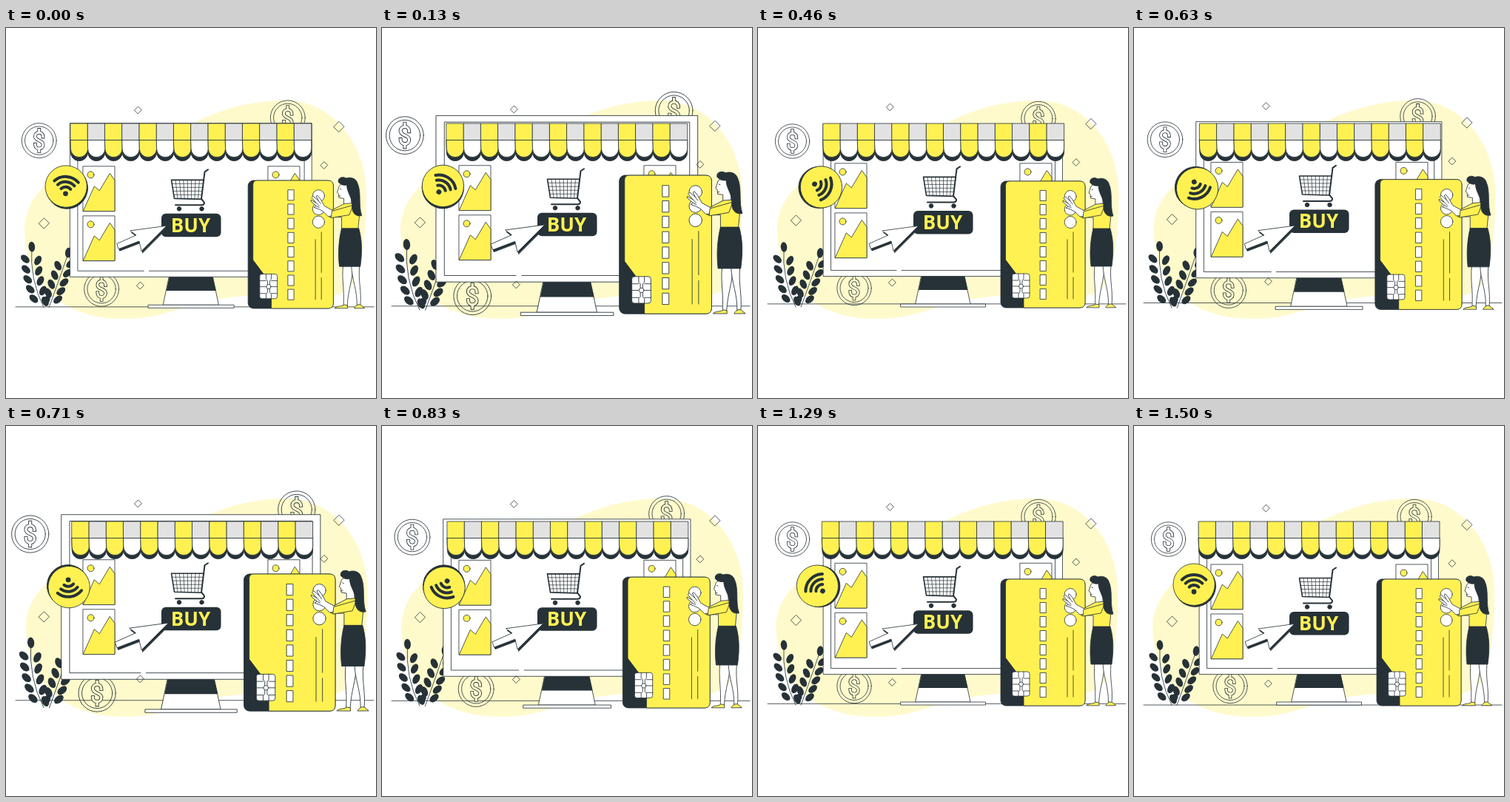
These frames come from a looping animation (500x500 px, 1.54 s). An HTML page:

```html
<!DOCTYPE html>
<html lang="en">
<head>
<meta charset="utf-8">
<title>Online shop</title>
<style>
  html, body { margin: 0; width: 100%; height: 100%; overflow: hidden; background: #fff; }
  svg { display: block; width: 100vw; height: 100vh; }
  .w { fill: #fff; }
  .y { fill: #fff152; }
  .d { fill: #263238; }
  .n { fill: none; }
  .l { stroke: #263238; stroke-width: .8; stroke-linejoin: round; stroke-linecap: round; }
  .buy { font: bold 26px "Noto Sans", "Open Sans", sans-serif; font-stretch: 62.5%; text-anchor: middle; }
</style>
</head>
<body>
<svg viewBox="0 0 500 500">
  <path class="sway" fill="#fffacb" d="M25 270C26 238 50 205 85 195C140 172 200 155 250 130C290 110 330 98 378 98C440 98 487 155 487 225C487 275 482 310 472 340C462 368 410 368 350 362C300 360 260 372 220 384C190 393 165 394 140 392C60 385 25 330 25 270Z"/>
  <path class="float n l" d="M13 377H497"/>
  <g class="beat" id="plants" data-c="52 333.5"></g>
  <g class="beat" id="coins" data-c="213 237"></g>

  <g class="beat" data-c="250 253.5">
    <path class="w l" d="M221 335H279L287 373H213Z"/>
    <path class="d" d="M221 335H279L283.5 354H217Z"/>
    <rect class="w l" x="193" y="373" width="114.5" height="4"/>
    <rect class="w l" x="88.5" y="130" width="323" height="205.5"/>
    <path class="n l" d="M187 327.5H98.5V138H401.5V327.5H194"/>
  </g>

  <g class="sway" id="awning"></g>

  <g class="float">
    <g id="pictures"></g>
    <g id="diamonds" class="l n"></g>
    <g id="cart" class="l n"></g>
    <rect class="d" x="210" y="251" width="80.5" height="31.5" rx="6"/>
    <text class="y buy" x="249.5" y="276">BUY</text>
  </g>

  <g class="beat" data-c="183 284">
    <path class="d l" d="M218 270L169.5 276.5L177.5 282.5L151.5 294L154 301L181.500 290.500L184.500 303.500Z"/>
    <path class="w l" d="M216.5 267.5L168 274L176 280L150 291.5L152.5 298.5L180 288L183 301Z"/>
  </g>

  <g id="badge">
    <circle class="d l" cx="82.4" cy="216.2" r="28.2"/>
    <circle class="y l" cx="81.1" cy="214.2" r="28.2"/>
    <circle class="d" cx="81" cy="224" r="3.4"/>
    <path id="waves" class="n" stroke="#263238" stroke-width="4" stroke-linecap="round"/>
  </g>

  <g class="beat" data-c="406 291">
    <rect class="d l" x="328" y="207" width="114" height="171" rx="7"/>
    <path class="y l" d="M334.5 313V213Q334.5 207 340 207H435Q442 207 442 214V371Q442 378 435 378H359V346Z"/>
    <g id="card"></g>
    <g id="woman" class="l">
      <path class="w" d="M455 320H468C468 342 462 350 460.5 375H455.5C457 350 453 342 455 320Z"/>
      <path class="w" d="M466 320H477C475 345 480 352 478 375H473.5C474 352 467 342 466 320Z"/>
      <path class="y" d="M444 377.5C447 374 455 376 456 373L461 374V377.5Z"/>
      <path class="y" d="M470 377.5C471 374 474 375 474 373H478L483.5 377.5Z"/>
      <path class="w" d="M456 209L450 214L447 223L449 224.5L449.5 230L456 231V240H466V212Z"/>
      <path class="n" d="M451 218l1.5 .5M449.500 228l2 -.5"/>
      <path class="y" d="M457 238L473 237L477 252L475 272H453V256L437 256L434 250Z"/>
      <path class="w" d="M441 247L430 241L425 232L421 227L419 228L422 234L415 228L413 230L419 237L412 233L412 235L419 241L416 243L422 245L428 248L435 255L443 254Z"/>
      <path class="n" d="M422 234L425 238M419 237L423 241M419 241L423 243"/>
      <path class="y" d="M468 240L440 248L439 257L463 253Z"/>
      <path class="d" d="M453 271H476C480 285 481 300 478 322H450C448 305 449 287 453 271Z"/>
      <path class="d" d="M449 209C447 203 455 201 459 204C465 202 472 204 474 210C480 223 475 240 480 254C471 256 466 249 467 239C467 229 460 223 460 213C455 214 451 212 449 209Z"/>
    </g>
  </g>
</svg>
<script>
const $ = id => document.getElementById(id);
const all = name => [...document.querySelectorAll("." + name)];
const repeat = (n, f) => Array.from({ length: n }, (_, i) => f(i)).join("");
const path = (cls, d) => `<path class="${cls}" d="${d}"/>`;
const circle = (cls, x, y, r) => `<circle class="${cls}" cx="${x}" cy="${y}" r="${r}"/>`;
const rect = (cls, x, y, w, h, extra = "") =>
  `<rect class="${cls}" x="${x}" y="${y}" width="${w}" height="${h}" ${extra}/>`;

// Sprigs: leaf pairs along a quadratic stem
const leaf = (x, y, angle) =>
  `<ellipse class="d" rx="4.3" ry="6.8" transform="translate(${x} ${y}) rotate(${angle})"/>`;
function sprig(x0, y0, cx, cy, x1, y1, lean) {
  const at = (a, b, c, q) => (1 - q) ** 2 * a + 2 * q * (1 - q) * b + q * q * c;
  return path("n l", `M${x0} ${y0}Q${cx} ${cy} ${x1} ${y1}`) + leaf(x1, y1, lean / 2) +
    repeat(5, i => {
      const q = .14 + i * .165, x = at(x0, cx, x1, q), y = at(y0, cy, y1, q);
      return leaf(x - 8.5, y + lean * .1, lean - 38) + leaf(x + 8.5, y - lean * .1, lean + 38);
    });
}
$("plants").innerHTML = sprig(51, 377, 32, 340, 35, 296, -10) + sprig(58, 377, 70, 345, 84, 304, 12);

const dollar = "M5.3 -5C5.3 -12.5 -5.3 -12.5 -5.3 -5.5C-5.3 1 5.3 -1 5.3 5.5C5.3 12.5 -5.3 12.5 -5.3 5M0 -14.5V-10.5M0 10.5V14.5";
const ink = (color, width) =>
  `<path fill="none" stroke="${color}" stroke-width="${width}" stroke-linecap="square" d="${dollar}"/>`;
$("coins").innerHTML = [[46.5, 153, "#fff"], [379, 122.5, "#fffacb"], [130, 351.5, "#fffacb"]].map(([x, y, core]) =>
  `<g transform="translate(${x} ${y})">${circle("n l", 0, 0, 23.2)}${circle("n l", 0, 0, 19)}${ink("#263238", 4.6)}${ink(core, 3)}</g>`).join("");

// Awning: 14 scalloped stripes with a dark edge below
const stripe = 325.5 / 14, left = 87.3;
const scallop = (cls, x, y, bottom) =>
  path(cls, `M${x} ${y}H${x + stripe}V${bottom}a${stripe / 2} 11.6 0 0 1 ${-stripe} 0Z`);
$("awning").innerHTML =
  repeat(14, i => scallop("d l", left + i * stripe, 151, 168)) +
  repeat(14, i => {
    const x = left + i * stripe, odd = i % 2;
    return scallop(odd ? "w l" : "y l", x, 151.5, 163) +
      rect(odd ? "l" : "y l", x, 129, stripe, 22.5, odd ? 'fill="#e2e2e2"' : "");
  });

$("pictures").innerHTML = [[104.3, 187], [104.3, 254], [354.3, 187]].map(([x, y]) =>
  `<g transform="translate(${x} ${y})">` + rect("w l", 0, 0, 42.7, 60.5) + circle("y l", 10.2, 11.5, 4.5) +
  path("y l", "M0 60.5L15 27L22 33L36 9.5L42.700 19V60.5Z") + "</g>").join("");

$("diamonds").innerHTML = [[178.5, 111, 4.8], [450, 133.5, 7], [430, 185.5, 4.8], [51.5, 264, 7], [181.5, 348, 4.8]]
  .map(([x, y, r]) => path("", `M${x - r} ${y}l${r} ${-r}l${r} ${r}l${-r} ${r}Z`)).join("");

$("cart").innerHTML =
  `<g stroke-width="1.6">${path("", "M223.5 205.5H267M223.5 205.5L227.5 230.5L264 231.5")}</g><g stroke-width=".7">` +
  repeat(7, i => path("", `M${229 + i * 5.4} 205.5L${232 + i * 4.6} 231`)) +
  repeat(4, i => path("", `M${224.3 + i * .8} ${210.5 + i * 5}H${266.4 - i * .6}`)) +
  `</g><g stroke-width="2">${path("", "M273 191.5L268.5 194.5L264 231L268 236Q268 239.5 264 239.5H229")}</g>` +
  circle("d", 234, 244.5, 2.8) + circle("d", 264.5, 244.5, 2.8);

$("waves").setAttribute("d", [9, 16, 23].map(r => {
  const k = r * Math.SQRT1_2;
  return `M${81 - k} ${224 - k}A${r} ${r} 0 0 1 ${81 + k} ${224 - k}`;
}).join(""));

$("card").innerHTML =
  repeat(8, i => rect("w l", 381.5, 219.5 + i * 19, 7.8, 14)) +
  repeat(3, i => circle("w l", 422.2, 227.5 + i * 17.5, 8)) +
  path("n l", "M418 286V366M426 276V330M426 337V366") +
  rect("w l", 343.5, 332, 23.5, 33, 'rx="3"') +
  path("n l", "M352 332V339L354 341V357L352 359V365M359 332V339L357 341V357L359 359V365M344 341H352M359 341H367M344 349H367M344 358H352M359 358H367") +
  circle("w l", 355.5, 349, 3);

// Motion
const PERIOD = 1500, LOOP = 1540, FPS = 24;
function track(q, keys) {
  const i = Math.max(1, keys.findIndex(k => q <= k[0]));
  const [a, va] = keys[i - 1], [b, vb] = keys[i];
  return va + (vb - va) * (q - a) / (b - a);
}
const heartbeat = [[0, 1], [.1, 1.1], [.3, 1], [.4, 1], [.5, 1.1], [.6, 1], [1, 1]];
const floating = [[0, 0], [.5, -6.5], [1, 0]];
const swaying = [[0, 0], [.1, -.1], [.25, .4], [.5, 1.9], [.75, -1.4], [1, .2]];
const beats = all("beat"), floats = all("float"), sways = all("sway");
const move = (list, value) => list.forEach(el => el.setAttribute("transform", value));

function draw(now) {
  const step = Math.min(36, Math.floor((now % LOOP + 5) * FPS / 1000));
  const q = Math.min(1, (step * 1000 / FPS + 16) / PERIOD);
  const s = track(q, heartbeat);
  for (const el of beats) {
    const [x, y] = el.dataset.c.split(" ");
    el.setAttribute("transform", `translate(${x * (1 - s)} ${y * (1 - s)}) scale(${s})`);
  }
  move(floats, `translate(0 ${track(q, floating)})`);
  move(sways, `translate(${track(q, swaying)} 0)`);
  $("badge").setAttribute("transform", `rotate(${360 * q} 83 216)`);
  requestAnimationFrame(draw);
}
draw(performance.now());
</script>
</body>
</html>
```
